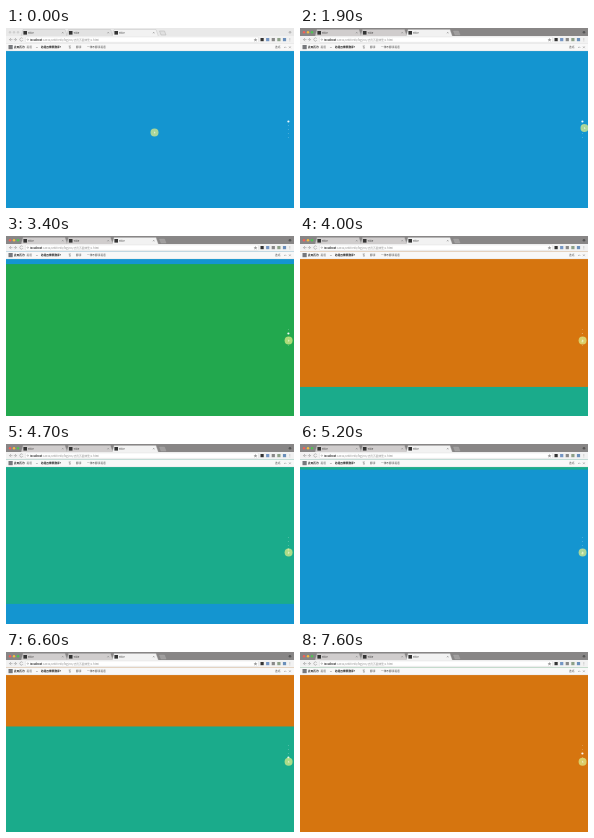
Write an HTML page that moves like this. It is 288x180 px and loops after 8 s.

```html
<!DOCTYPE html>
<html lang="zh">
<head>
<meta charset="utf-8">
<title>Page scroll</title>
<style>
  html, body { margin: 0; width: 100%; height: 100%; overflow: hidden; }
  svg { display: block; width: 100vw; height: 100vh; }
  text { font: 2.7px "Noto Sans CJK SC", "Noto Sans CJK", "Noto Sans", sans-serif; fill: #444; }
  .bold { font-weight: bold; fill: #222; }
  .tab text { fill: #333; }
  .icon { fill: none; stroke: #888; stroke-width: .5; }
</style>
</head>
<body>
<svg viewBox="0 0 288 180">
  <g id="pages"></g>
  <g id="dots"></g>
  <g id="chrome">
    <rect id="strip" width="288" height="9"/>
    <g id="lights"></g>
    <g id="tabs"></g>
    <path id="plus" d="M153.5 3h5l1.5 4h-5z" stroke="#aaa" stroke-width=".4"/>
    <circle id="user" cx="284" cy="4.2" r="1.3"/>
    <rect y="8" width="288" height="7.5" fill="#f2f2f2"/>
    <path class="icon" d="M5 10l-1.5 1.6 1.5 1.6M3.5 11.6h3M9 10l1.5 1.6-1.5 1.6M7.8 11.6h2.6M16.7 10.5a1.6 1.6 0 1 0 .2 1.7"/>
    <rect x="19.5" y="9" width="233" height="5.3" rx=".8" fill="#fff" stroke="#ccc" stroke-width=".3"/>
    <circle class="icon" cx="21.8" cy="11.6" r=".7"/>
    <text x="24" y="12.6"><tspan class="bold">localhost</tspan><tspan fill="#888">:63342/untitled4/fogi/04/会员页面效果/1.html</tspan></text>
    <path d="M249.5 10l.6 1.2 1.3.1-1 .9.3 1.3-1.2-.7-1.2.7.3-1.3-1-.9 1.3-.1z" fill="#999"/>
    <g id="tools"></g>
    <path class="icon" d="M283.8 10v.7m0 .6v.7m0 .6v.7"/>
    <rect y="15.5" width="288" height="7.5" fill="#f8f8f8"/>
    <path d="M0 15.5h288M0 22.8h288" stroke="#ccc" stroke-width=".3"/>
    <rect x="2.5" y="17" width="4.2" height="4.2" fill="#77797d"/>
    <g id="bar"></g>
    <path class="icon" d="M30 19l.9 1 .9-1M278 20l1.2-1.2 1.2 1.2M283 18.4l1.8 1.8m0-1.8l-1.8 1.8"/>
  </g>
  <g id="cursor">
    <circle r="4" fill="#dcec88" fill-opacity=".75"/>
    <path d="M-.5-1.2v2.2l1.7-.5z" fill="#fff" fill-opacity=".6"/>
  </g>
</svg>
<script>
const $ = id => document.getElementById(id);

function add(parent, tag, attrs, text = "") {
  const node = document.createElementNS("http://www.w3.org/2000/svg", tag);
  for (const key in attrs) node.setAttribute(key, attrs[key]);
  node.textContent = text;
  return parent.appendChild(node);
}

const LOOP = 8000, STEP = 100, TOP = 23, PAGE = 157;
const SCROLL = 700, FADE = 300, GLIDE = 200, FOCUS = 1700;
const BLUE = "#1495d0", GREEN = "#22a84e", ORANGE = "#d6750f", TEAL = "#1aab8b";
const colors = [BLUE, GREEN, ORANGE, TEAL, BLUE];

// A click marks its dot at once, the wheel only after the scroll.
const turns = [
  { at: 2860, to: 1 }, { at: 3760, to: 3 }, { at: 4616, to: 4 },
  { at: 5385, to: 3, wheel: true }, { at: 6450, to: 2, wheel: true }
];

// Cursor stops: arrival time, x, y
const stops = [
  [0, 148.5, 104.5], [500, 283, 88.5], [1200, 284, 96.5], [1900, 284.5, 100],
  [2700, 283, 97.5], [3300, 282.6, 104.5], [4400, 282.6, 108.4], [6200, 282.6, 109.7]
];

const pages = colors.map(fill => add($("pages"), "rect", { width: 288, height: PAGE + 1, fill }));
const dots = colors.map((_, i) =>
  add($("dots"), "circle", { cx: 282.4, cy: 93.5 + i * 4, fill: "#fff" }));

const lights = ["#f35f57", "#f5bd3f", "#50c254"].map((color, i) =>
  ({ color, node: add($("lights"), "circle", { cx: 4 + i * 4, cy: 4.3, r: 1.2 }) }));

const tabs = colors.slice(0, 3).map((_, i) => {
  const tab = add($("tabs"), "g", { class: "tab", transform: `translate(${15 + i * 45.5})` });
  const shape = add(tab, "path", { d: "M0 8.5L2 1.5H44L46.5 8.5Z", stroke: "#aaa", "stroke-width": .3 });
  add(tab, "rect", { x: 2.4, y: 3, width: 3.6, height: 3.6, fill: "#333" });
  add(tab, "text", { x: 7, y: 5.8 }, "Title");
  add(tab, "path", { class: "icon", d: "M41 4l1.4 1.4m0-1.4l-1.4 1.4" });
  return shape;
});

["#333", "#7596c4", "#888", "#8ca088", "#6b8fba"].forEach((fill, i) =>
  add($("tools"), "rect", { x: 254.5 + i * 5.6, y: 10, width: 3.2, height: 3.2, fill }));

[[8, "此网页为", "bold"], [20.5, "英语"], [35, "您是否需要翻译？", "bold"],
 [62.5, "否"], [70, "翻译"], [81, "一律不翻译英语"], [269, "选项"]].forEach(([x, label, kind = ""]) =>
  add($("bar"), "text", { x, y: 20.2, class: kind }, label));

const clamp = v => Math.max(0, Math.min(1, v));
const mix = (a, b, k) => a + (b - a) * k;

// CSS "ease": cubic-bezier(.25, .1, .25, 1)
function ease(x) {
  if (x <= 0 || x >= 1) return clamp(x);
  const curve = (a, b, s) => 3 * a * s * (1 - s) ** 2 + 3 * b * s * s * (1 - s) + s ** 3;
  let lo = 0, hi = 1;
  for (let i = 0; i < 24; i++) {
    const mid = (lo + hi) / 2;
    if (curve(.25, .25, mid) < x) lo = mid; else hi = mid;
  }
  return curve(.1, 1, lo);
}

function cursorAt(t) {
  let [, x, y] = stops[0];
  for (const [arrive, nextX, nextY] of stops.slice(1)) {
    const k = clamp((t - arrive) / GLIDE + 1);
    x = mix(x, nextX, k);
    y = mix(y, nextY, k);
  }
  return [x, y];
}

function paintChrome(active) {
  const fill = (node, on, off) => node.setAttribute("fill", active ? on : off);
  fill($("strip"), "#888686", "#e9e9e9");
  fill($("plus"), "#a09e9e", "#e0e0e0");
  fill($("user"), "#555", "#bbb");
  lights.forEach(({ node, color }) => fill(node, color, "#cfcfcf"));
  tabs.forEach((tab, i) => i < 2 ? fill(tab, "#d0cdcd", "#e2e2e2") : fill(tab, "#f2f2f2", "#f2f2f2"));
}

function draw(t) {
  let scroll = 0, weight = colors.map((_, i) => i ? 0 : 1);
  for (const { at, to, wheel } of turns) {
    scroll = mix(scroll, to, ease((t - at) / SCROLL));
    const k = clamp((t - at - (wheel ? SCROLL : 0)) / FADE);
    weight = weight.map((w, i) => mix(w, i == to ? 1 : 0, k));
  }
  pages.forEach((page, i) => page.setAttribute("y", TOP + (i - scroll) * PAGE));
  dots.forEach((dot, i) => {
    dot.setAttribute("r", mix(.5, 1.1, weight[i]));
    dot.setAttribute("fill-opacity", mix(.3, .95, weight[i]));
  });
  paintChrome(t >= FOCUS);
  $("cursor").setAttribute("transform", `translate(${cursorAt(t)})`);
}

function tick(now) {
  draw(Math.floor(now % LOOP / STEP) * STEP);
  requestAnimationFrame(tick);
}
tick(performance.now());
</script>
</body>
</html>
```
